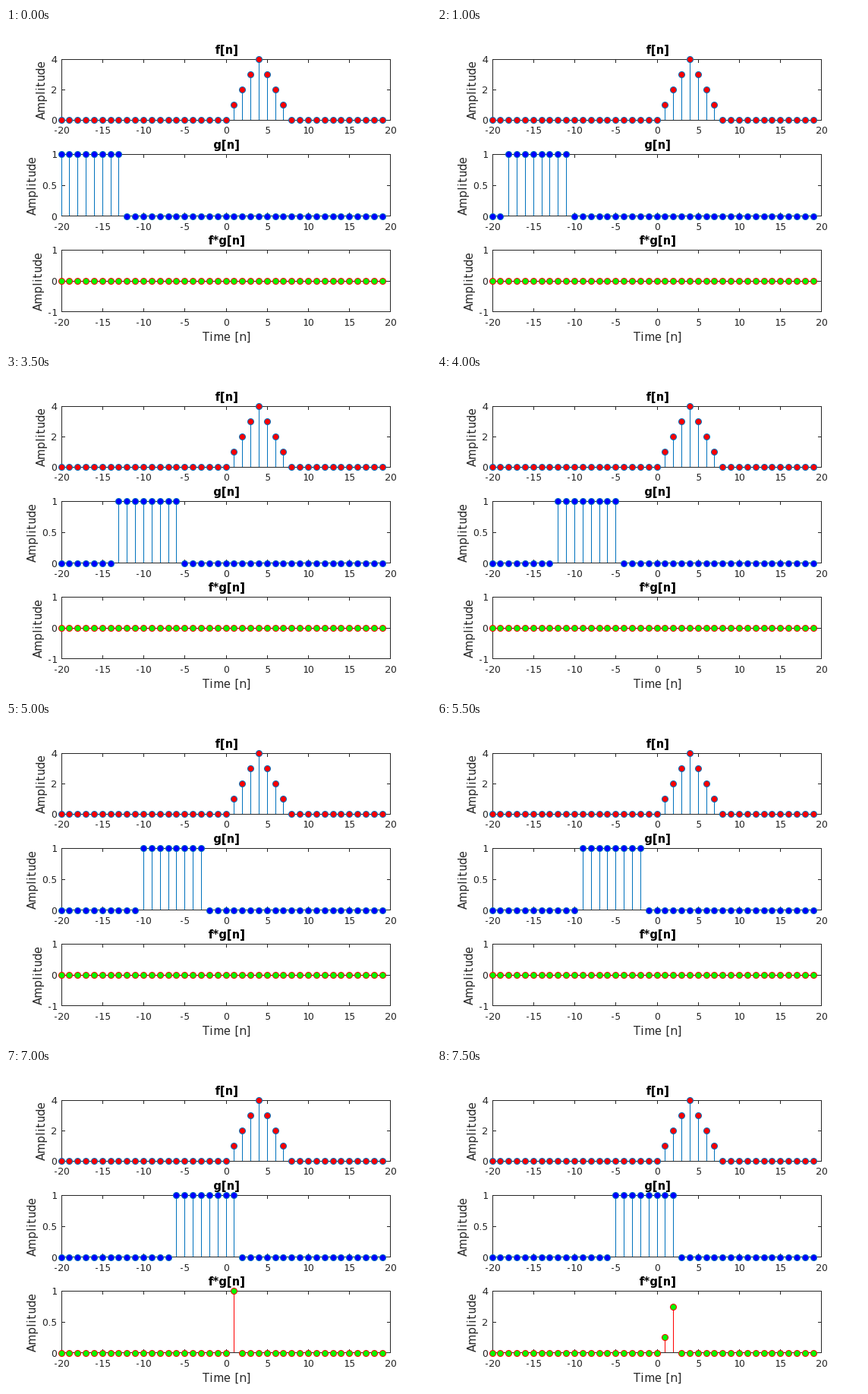
Write a matplotlib script that moves like this. It is 560 px wide and 420 px high and loops after 8 s.

```python
import numpy as np
import matplotlib.pyplot as plt
from matplotlib.animation import FuncAnimation
from matplotlib.patches import Circle

W, H, DPI = 560, 420, 100
PX = 72 / DPI  # points per pixel
LEFT, RIGHT = 73, 506
INK, BLUE = "#262626", "#0072bd"
STEPS, INTERVAL = 16, 500

n = np.arange(-20, 20)
f = np.maximum(4 - abs(n - 4), 0)
WIDTH = 8

# Whole-pixel glyph advances
plt.rcParams.update({"font.family": "DejaVu Sans", "text.hinting_factor": 1})
fig = plt.figure(figsize=(W / DPI, H / DPI), dpi=DPI, facecolor="white")
ax = fig.add_axes([0, 0, 1, 1])


def px_x(v):
    return int(LEFT + 0.02 + (v + 20) * 10.85)


def line(x0, y0, x1, y1, color=INK):
    ax.plot([x0 + 0.5, x1 + 0.5], [y0 + 0.5, y1 + 0.5], color=color, lw=PX,
            solid_capstyle="projecting", snap=False)


def text(x, y, s, size=13, color=INK, ha="center", **kw):
    ax.text(x + 0.5, y, s, fontsize=size * PX, color=color, ha=ha,
            va="baseline", **kw)


def frame_box(top, bottom, yticks, px_y):
    y0, y1 = int(top), int(bottom)
    for y in (y0, y1):
        line(LEFT, y, RIGHT, y)
    for x in (LEFT, RIGHT):
        line(x, y0, x, y1)
    for v in range(-20, 20, 5):
        x = px_x(v)
        line(x, y1, x, y1 - 4)
        line(x, y0, x, y0 + 4)
    for v in range(-20, 21, 5):
        text(px_x(v), round(bottom) + 18, str(v))
    for v in yticks:
        y = int(px_y(v))
        line(LEFT, y, LEFT + 4, y)
        line(RIGHT, y, RIGHT - 4, y)
        text(67, round(px_y(v)) + 5, f"{v:g}", ha="right")


def stem_panel(top, bottom, values, yticks, title, label_x, stem, fill):
    lo, hi = yticks[0], yticks[-1]

    def px_y(v):
        return bottom - (v - lo) / (hi - lo) * (bottom - top)

    frame_box(top, bottom, yticks, px_y)
    text(290, int(top) - 7, title, 15, "black", weight="bold")
    ax.text(label_x, (top + bottom) / 2, "Amplitude", fontsize=15 * PX,
            color=INK, rotation=90, ha="right", va="center")

    base = int(px_y(0))
    for k, v in zip(n, values):
        x, y = px_x(k), round(px_y(v))
        if v:
            line(x, base, x, y, stem)
        ax.add_patch(Circle((x + 0.5, y + 0.5), 4, fc=fill, ec=stem, lw=PX,
                            zorder=3))
    line(LEFT, base, RIGHT, base)


def draw(i):
    ax.clear()
    ax.set(xlim=(0, W), ylim=(H, 0))
    ax.axis("off")

    front = i - 13
    g = ((n <= front) & (n > front - WIDTH)).astype(int)
    conv = np.convolve(f, np.ones(WIDTH, int))[:n.size] * (n <= front)
    peak = conv.max()
    if peak == 0:
        ticks, label_x = (-1, 0, 1), 51
    elif peak == 1:
        ticks, label_x = (0, 0.5, 1), 43
    else:
        ticks, label_x = (0, 2, 4), 55

    stem_panel(41.1, 121.3, f, (0, 2, 4), "f[n]", 55, BLUE, "red")
    stem_panel(166.4, 247.7, g, (0, 0.5, 1), "g[n]", 43, BLUE, "blue")
    stem_panel(292.4, 373.7, conv, ticks, "f*g[n]", label_x, "red", "lime")
    text(290, 412, "Time [n]", 15)
    return []


anim = FuncAnimation(fig, draw, frames=STEPS, interval=INTERVAL,
                     init_func=lambda: [], repeat=True, repeat_delay=0)
plt.show()
```
